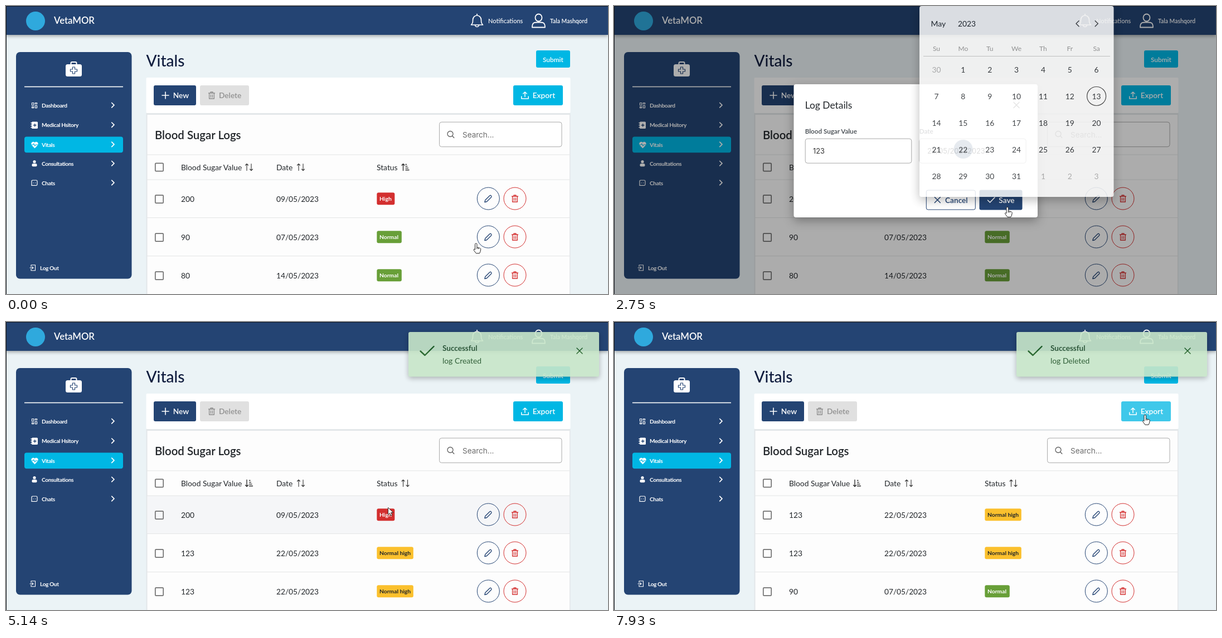
An HTML page for the animation above (8 s loop, 1080x519 px).

```html
<!DOCTYPE html>
<html lang="en">
<head>
<meta charset="utf-8">
<title>Vitals</title>
<style>
html, body { margin: 0; width: 100%; height: 100%; overflow: hidden; background: #ebf3f6; }
svg { display: block; width: 100vw; height: 100vh; font-family: Lato, "Open Sans", sans-serif; }
text { white-space: pre; }
.field { font-family: Inter, "Open Sans", sans-serif; }
.nav { font-weight: 700; font-size: 10.2px; letter-spacing: -.4px; fill: #fff; }
.line { fill: none; stroke-linecap: round; stroke-linejoin: round; }
.raised { filter: drop-shadow(0 6px 9px rgba(0,0,0,.32)); }
.toast { filter: drop-shadow(0 3px 5px rgba(0,0,0,.3)); }
.bar { filter: drop-shadow(0 2px 3px rgba(0,0,0,.35)); }
</style>
</head>
<body>
<svg id="stage" viewBox="0 0 1080 519" preserveAspectRatio="none"></svg>
<script>
const NAVY = '#244473', CYAN = '#00b7e4', RED = '#d32f2f', INK = '#212529';
const LOOP = 8000;

// Markup helpers
const text = (x, y, s, size, fill = INK, weight = 400, more = '') =>
  `<text x="${x}" y="${y}" font-size="${size}" fill="${fill}" font-weight="${weight}" ${more}>${s}</text>`;
const box = (x, y, w, h, fill, r = 0, more = '') =>
  `<rect x="${x}" y="${y}" width="${w}" height="${h}" fill="${fill}" rx="${r}" ${more}/>`;
const line = (d, color, width = 1.3, x = 0, y = 0) =>
  `<path class="line" d="${d}" stroke="${color}" stroke-width="${width}" transform="translate(${x} ${y})"/>`;
const solid = (d, fill, x = 0, y = 0) => `<path d="${d}" fill="${fill}" transform="translate(${x} ${y})"/>`;
const group = (id, body, more = '') => `<g id="${id}" ${more}>${body}</g>`;
const rule = y => box(253, y, 758, 1, '#e4e5e6');

const ICON = {
  trash: 'M-5.5-4h11M-2-4v-2h4v2M-4.4-4v10h8.8v-10M-1.5-1v4.5M1.5-1v4.5',
  pencil: 'M-6.5 6.5l1-3.8 8-8a2 2 0 0 1 2.8 2.8l-8 8z',
  close: 'M-5-5L5 5M5-5L-5 5',
  upload: 'M0 2.5V-6M-3.2-3L0-6l3.2 3M-6.2 2v4h12.4V2',
  right: 'M-2.3-4.2L2-0-2.3 4.2',
  both: 'M-4 6V-6M-6.5-3.5L-4-6l2.5 2.5M4-6V6M1.5 3.5L4 6l2.5-2.5',
  bars: 'M.5-5h1.5M.5-1.7h3M.5 1.7h4.5M.5 5h6',
  up: 'M-4 6V-6M-6.5-3.5L-4-6l2.5 2.5',
  down: 'M-4-6V6M-6.5 3.5L-4 6l2.5-2.5'
};
const sortIcon = (x, kind) => kind === 'both' ? line(ICON.both, '#333', 1.1, x, 290.5)
  : line(ICON[kind] + ICON.bars, '#222', 1.3, x, 290.5);

// Page
function header() {
  const bell = 'M-10.5 8h21c-3-3-3-5-3-9a7.5 8 0 0 0-15 0c0 4 0 6-3 9zM-3.5 8a3.5 3.5 0 0 0 7 0M0-9v-2.5';
  return box(0, 0, 1080, 52, NAVY, 0, 'class="bar"') +
    `<circle cx="53" cy="27" r="17" fill="#2fa9dd"/>` +
    text(86, 31.5, 'VetaMOR', 16.7, '#fff', 600) +
    line(bell, '#fff', 1.7, 845, 26) + text(865, 31, 'Notifications', 11, '#fff', 500) +
    line('M-6 0a6 6.5 0 1 1 12 0a6 6.5 0 1 1-12 0M-11.5 17.5c0-10 5-9 11.5-9s11.5-1 11.5 9z', '#fff', 1.8, 955.5, 21) +
    text(976, 30.5, 'Tala Mashqord', 10.4, '#fff', 600);
}

function sidebar() {
  const items = [['Dashboard', 179], ['Medical Hsitory', 214.5], ['Vitals', 249.7], ['Consultations', 284], ['Chats', 318.7]];
  let s = box(18, 83, 207.5, 408.5, NAVY, 7);
  s += box(107, 105, 29, 22, '#fff', 3.5) + line('M-5-9v-3a2 2 0 0 1 2-2h6a2 2 0 0 1 2 2v3', '#fff', 2, 121.5, 115) +
    line('M-2-6h4v4h4v4h-4v4h-4v-4h-4v-4h4z', NAVY, 1.2, 121.5, 116);
  s += box(33, 144.7, 177, 1.6, '#fff') + box(33, 235.5, 177, 28.7, CYAN, 4);
  for (const [name, y] of items)
    s += `<text class="nav" x="64" y="${y + 3.8}">${name}</text>` + line(ICON.right, '#fff', 1.7, 192, y - .3);
  s += line('M-4.5-4.5h3.2v4.5h-3.2zM1.2-4.5h3.4v2.3H1.2zM1.2.6h3.4v4H1.2zM-4.5 2.6h3.2v2h-3.2z', '#fff', 1.1, 51, 179);
  s += box(46, 208.5, 11, 12.5, '#fff', 1.6) + line('M-2.3 0h4.6M0-2.3v4.6', NAVY, 1.4, 51.7, 214.7) +
    line('M0-4h1.4M0 0h1.4M0 4h1.4', '#fff', 1.2, 44.7, 214.7);
  s += solid('M0 6.5L-5.7.5C-8-3.5-3-7.5 0-4 3-7.5 8-3.5 5.7.5z', '#fff', 51.5, 250) +
    line('M-7 0h4l1.3-2L.3 2.2 1.8 0H7', CYAN, 1.1, 51.5, 250);
  s += `<circle cx="51" cy="280.7" r="2.6" fill="#fff"/>` + box(46.5, 284, 9, 5.3, '#fff', 2);
  s += line('M-3.2-4.7h6.4a1.8 1.8 0 0 1 1.8 1.8v5.8a1.8 1.8 0 0 1-1.8 1.8h-8.2v-7.6a1.8 1.8 0 0 1 1.8-1.8M-1.7 0v.1M1.7 0v.1', '#fff', 1.2, 51, 318.7);
  s += line('M-3-2v-3h7.5v10H-3V2M-5 0h6M-.8-1.8L1 0-.8 1.8', '#fff', 1.1, 48, 471.7);
  return s + '<text class="nav" x="61" y="475.6">Log Out</text>';
}

function page() {
  let s = text(251.5, 109, 'Vitals', 28, '#0e1b3d', 500);
  s += box(951, 80, 61, 31, CYAN, 3) + text(963, 100.5, 'Submit', 11.9, '#fff', 600);
  s += box(251.5, 129, 761, 64, '#fff', 2) + box(251.5, 193, 761, 326, '#e3e7e9') + box(253.5, 196, 757.5, 323, '#fdfdfd');
  s += box(265, 143, 76, 36, NAVY, 3, 'id="newBtn"') + line('M-6 0H6M0-6V6', '#fff', 1.6, 286, 161) +
    text(299.7, 166.3, 'New', 13.7, '#fff', 600);
  s += box(348, 143, 88, 36, '#e0e0e0', 3) + line(ICON.trash, '#8d8d8d', 1.3, 369, 161) +
    text(382, 166.3, 'Delete', 13.7, '#919191', 600);
  s += box(910, 143, 89, 36, CYAN, 3, 'id="exportBtn"') + line(ICON.upload, '#fff', 1.5, 931, 161) +
    text(944.7, 166.3, 'Export', 13.7, '#fff', 600);
  s += text(267, 239.5, 'Blood Sugar Logs', 20.4, INK, 600);
  s += box(777.5, 209.2, 219.5, 44.5, '#fff', 4, 'stroke="#a9a9a9"') +
    line('M-5.5-1a5 5 0 1 1 10 0a5 5 0 1 1-10 0M3.2 2.7L6.3 6', '#5f5f5f', 1.3, 797.5, 231.5) +
    text(819, 236.5, 'Search...', 13.5, '#6c6c6c', 400, 'class="field"');
  s += group('hover', box(0, 0, 1, 1, 'rgba(36,68,115,.12)'));
  s += [267.5, 312.5, 381, 450].map(rule).join('');
  s += text(314, 296, 'Blood Sugar Value', 13.8) + text(485, 296, 'Date', 13.8) + text(665, 296, 'Status', 13.8);
  s += sortIcon(529, 'both');
  for (const y of [290.5, 348, 417, 486])
    s += box(267.8, y - 7.2, 14.4, 14.4, 'none', 1.5, 'stroke="#707070" stroke-width="1.7"');
  for (let i = 0; i < 3; i++) {
    const y = 347 + i * 69;
    s += `<circle cx="865.3" cy="${y}" r="20" fill="none" stroke="${NAVY}"/>` + line(ICON.pencil, NAVY, 1.3, 865.3, y) +
      `<circle ${i ? '' : 'id="trashBtn"'} cx="913" cy="${y}" r="20" fill="rgba(211,47,47,0)" stroke="${RED}"/>` +
      line(ICON.trash, RED, 1.3, 913, y);
  }
  return s;
}

// Table contents for each sort state
const BADGE = { High: [32, RED, '#fff'], Normal: [44.5, '#689f38', '#fff'], 'Normal high': [65.5, '#fbc02d', INK] };
const LOGS = {
  a: [200, '09/05/2023', 'High'], b: [90, '07/05/2023', 'Normal'], c: [80, '14/05/2023', 'Normal'],
  d: [87, '19/05/2023', 'Normal'], e: [123, '22/05/2023', 'Normal high']
};
const VIEWS = [
  { from: 0, rows: 'abc', value: 'both', status: 'up' },
  { from: 4060, rows: 'cdb', value: 'up', status: 'both' },
  { from: 4340, rows: 'aee', value: 'down', status: 'both' },
  { from: 6740, rows: 'eeb', value: 'down', status: 'both' }
];
const view = (v, i) => group('view' + i, sortIcon(436, v.value) + sortIcon(716.5, v.status) + [...v.rows].map((key, n) => {
  const [value, date, state] = LOGS[key], [w, fill, ink] = BADGE[state], y = 347.3 + n * 69;
  return text(314, y + 5.5, value, 13.8) + text(485, y + 5.5, date, 13.7) +
    box(665.3, y - 11, w, 22, fill, 3) + text(670, y + 3.8, state, 10.3, ink, 700);
}).join(''));

// Overlays
const toast = (id, what) => group(id, box(722, 18, 342, 80.5, '#c8e6c9', 3) +
  line('M-12 .5L-4 8 12-8', '#1b5e20', 2.4, 755.5, 52) + text(783, 52, 'Successful', 13.6, '#1d4a24', 600) +
  text(783, 75.3, `log ${what}`, 13.9, '#1f5226') + line(ICON.close, '#1b5e20', 1.5, 1029, 52), 'class="toast"');

function logDialog() {
  return group('logDialog', box(322.5, 141, 437.5, 240, '#fff', 4) +
    text(342.7, 185, 'Log Details', 17.4) + line(ICON.close, '#555', 1.4, 722, 178.5) +
    text(342.7, 229.7, 'Blood Sugar Value', 11.7, '#3d4349', 600) + text(547.7, 229.7, 'Date', 11.7, '#3d4349', 600) +
    box(343.2, 239.2, 190.6, 44, '#fff', 4, 'id="valueBox"') + box(548, 239.2, 191.2, 44, '#fff', 4, 'id="dateBox"') +
    text(357, 266, '', 12.8, '#333', 400, 'class="field" id="value"') +
    text(562, 266, '', 12.8, '#333', 400, 'class="field" id="date"') + box(0, 253.5, 1, 16, '#222', 0, 'id="caret"') +
    box(560.3, 332, 88, 35, '#fff', 3, `stroke="${NAVY}"`) + line(ICON.close, NAVY, 1.5, 580.3, 349.5) +
    text(594, 355, 'Cancel', 13.7, NAVY, 600) + box(655.5, 331.5, 77, 36, NAVY, 3) +
    line('M-6 .5L-2 4.5 6.5-4.5', '#fff', 1.6, 676.5, 349.5) + text(690.3, 355, 'Save', 13.7, '#fff', 600), 'class="raised"');
}

function calendar() {
  let s = box(548, 0, 348.5, 344, '#fff', 4) + text(568.5, 36.8, 'May', 13.9) + text(617, 36.8, '2023', 13.8) +
    line('M2.5-5L-2.5 0l5 5', '#444', 1.5, 831.5, 31.7) + line('M-2.5-5L2.5 0l-5 5', '#444', 1.5, 865.7, 31.7) +
    box(555, 90, 335, 1, '#c4c4c4');
  const mid = 'text-anchor="middle"', col = i => 578.5 + i * 47.85;
  ['Su', 'Mo', 'Tu', 'We', 'Th', 'Fr', 'Sa'].forEach((d, i) => s += text(col(i), 81, d, 12, '#8d8d8d', 400, mid));
  s += `<circle cx="626.5" cy="258" r="17" fill="rgba(36,68,115,.13)"/>` +
    `<circle cx="865.6" cy="162.5" r="17" fill="none" stroke="#333" stroke-width="1.2"/>`;
  for (let i = 0; i < 35; i++) {
    const out = i < 1 || i > 31, day = i < 1 ? 30 : i > 31 ? i - 31 : i;
    s += text(col(i % 7), 120 + 47.9 * Math.floor(i / 7), day, 13.8, out ? '#a9a9a9' : INK, 400, mid);
  }
  return group('calendar', s, 'class="raised"');
}

function confirmDialog() {
  return group('confirm', box(324, 168, 434, 185.5, '#fff', 4) + text(344.7, 211.5, 'Confirm', 17.1) +
    line(ICON.close, '#555', 1.4, 720.5, 205) +
    line('M0-11.5L12.5 11.5h-25zM0-4v8M0 7.6v.2', '#222', 1.9, 358.3, 256.5) +
    text(385.5, 267.7, 'Are you sure you want to delete the blood sugar log?', 13.6, '#333') +
    box(616, 304.7, 53.5, 35, '#fff', 3, `stroke="${NAVY}"`) + text(633.3, 327.8, 'No', 13.7, NAVY, 600) +
    box(677, 304.5, 54, 35.5, RED, 3) + text(693, 327.8, 'Yes', 13.4, '#fff', 600), 'class="raised"');
}

const POINTERS = {
  hand: '<path d="M-2 1.5a1.7 1.7 0 0 1 3.4 0V7l5 1.2c1.3.4 2 1 1.8 2.5l-.8 4-1.4 3H-.2l-4-5.5c-1-1.5.6-2.6 1.8-1.6l.4.6z" fill="#fff" stroke="#222" stroke-linejoin="round"/><path d="M1.4 7v3M4 8v2" stroke="#222" fill="none"/>',
  arrow: '<path d="M0 0v13l3-2.8 2 4.6 2.2-1-2-4.5h4z" fill="#fff" stroke="#222" stroke-width=".9"/>',
  beam: line('M-3.5-7H-1l1 1 1-1h2.5M0-6V6M-3.5 7H-1l1-1 1 1h2.5', '#111', 1.5)
};

document.getElementById('stage').innerHTML =
  box(0, 0, 1080, 519, '#ebf3f6') + header() + sidebar() + page() + VIEWS.map(view).join('') +
  toast('created', 'Created') + toast('deleted', 'Deleted') +
  box(0, 0, 1080, 519, '#000', 0, 'id="mask"') + box(0, 0, 1, 519, '#0b0f16') + box(0, 0, 1080, 1, '#0b1526') +
  logDialog() + calendar() + confirmDialog() +
  group('pointer', Object.keys(POINTERS).map(k => group(k, POINTERS[k])).join(''));

const el = {};
document.querySelectorAll('[id]').forEach(e => el[e.id] = e);
const set = (e, attrs) => { for (const k in attrs) e.setAttribute(k, attrs[k]); };
const show = (e, on) => e.setAttribute('display', on ? 'inline' : 'none');

// Pointer path: time, x, y
const PATH = [
  [0, 843.5, 428], [40, 843.5, 428], [670, 318, 143], [800, 303, 160], [960, 303, 160], [1330, 465.5, 262],
  [1720, 465.5, 262], [2020, 630, 258], [2500, 630, 257], [2745, 706, 362.5], [3330, 706, 362.5],
  [4040, 377, 295], [4700, 377, 295], [5500, 912, 363], [6080, 912, 363], [6640, 691, 329],
  [6960, 691, 329], [7770, 954, 169], [7850, 954, 169], [7930, 953, 167.5], [8000, 953, 167.5]
];
const KINDS = [
  [0, 'hand'], [110, 'arrow'], [690, 'hand'], [1010, 'arrow'], [1240, 'beam'], [1830, 'arrow'], [1900, 'beam'],
  [2130, 'hand'], [2560, 'arrow'], [2690, 'hand'], [3340, 'arrow'], [3930, 'hand'], [4860, 'arrow'], [5440, 'hand'],
  [5690, 'arrow'], [6570, 'hand'], [6890, 'arrow'], [7600, 'hand']
];
const TYPED = [[0, ''], [1400, '1'], [1580, '12'], [1690, '123']];
const at = (table, t) => table.filter(r => r[0] <= t).pop()[1];
const easeOut = p => 1 - (1 - p) ** 3;
const smooth = p => p * p * (3 - 2 * p);

function pointerAt(t) {
  let i = 0;
  while (i < PATH.length - 2 && PATH[i + 1][0] <= t) i++;
  const [t0, x0, y0] = PATH[i], [t1, x1, y1] = PATH[i + 1], p = smooth((t - t0) / (t1 - t0));
  return [x0 + (x1 - x0) * p, y0 + (y1 - y0) * p];
}

function popup(e, amount, base) {
  show(e, amount > 0);
  set(e, { opacity: amount, transform: `translate(541 260.8) scale(${(.7 + .3 * amount) / base}) translate(-541 -260.8)` });
}

function slide(e, enter, leave) {
  show(e, enter > 0 && leave < 1);
  set(e, { opacity: .9 * enter * (1 - leave), transform: `translate(0 ${40 * (1 - enter)})` });
}

function hoverBox(x, y, t, dim) {
  if (dim) return null;
  if (y > 268 && y < 312.5) {
    const edges = [300, 471.5, 651, 830], i = edges.findIndex((e, n) => x >= e && x < edges[n + 1]);
    return i < 0 ? null : [edges[i], 268, edges[i + 1] - edges[i], 44.5, 1];
  }
  return t > 3300 && y >= 312.5 && y < 381 ? [254, 313, 757, 68, .3] : null;
}

function draw(t) {
  const ramp = (a, b) => Math.min(1, Math.max(0, (t - a) / (b - a)));
  const during = (a, b) => t >= a && t < b;

  VIEWS.forEach((v, i) => show(el['view' + i], during(v.from, i < 3 ? VIEWS[i + 1].from : LOOP)));
  const dim = ramp(930, 1080) - ramp(3220, 3400) + ramp(5660, 5800) - ramp(6760, 6910);
  set(el.mask, { opacity: .32 * dim });
  popup(el.logDialog, easeOut(ramp(940, 1090)) - ramp(3200, 3350), 1);
  popup(el.confirm, easeOut(ramp(5690, 5840)) - ramp(6731, 6881), .99);
  slide(el.created, easeOut(ramp(3230, 3530)), ramp(6200, 6400));
  slide(el.deleted, easeOut(ramp(6775, 7075)), 0);

  const cal = ramp(2080, 2200), gone = ramp(2735, 2835);
  show(el.calendar, cal > 0 && gone < 1);
  set(el.calendar, { opacity: cal * (1 - gone), transform: `translate(0 344) scale(1 ${.8 + .2 * cal}) translate(0 -344)` });

  const focus = (e, on) => set(e, { stroke: on ? NAVY : '#a9a9a9', 'stroke-width': on ? 2 : 1 });
  focus(el.valueBox, during(1250, 2050));
  focus(el.dateBox, during(2050, 2700));
  el.value.textContent = at(TYPED, t);
  el.date.textContent = t >= 2520 ? '22/05/20232023' : '';
  show(el.caret, during(1280, 2050));
  set(el.caret, { x: 357 + (el.value.textContent ? el.value.getComputedTextLength() : 0) });

  set(el.newBtn, { fill: during(700, 960) ? '#3c5985' : NAVY });
  set(el.exportBtn, { fill: t >= 7640 ? '#3fc8ea' : CYAN });
  set(el.trashBtn, { fill: `rgba(211,47,47,${during(5440, 5600) ? .05 : during(5600, 6740) ? .18 : 0})` });

  const [x, y] = pointerAt(t), h = hoverBox(x, y, t, dim > .01);
  show(el.hover, h);
  if (h) {
    set(el.hover.firstChild, { x: h[0], y: h[1], width: h[2], height: h[3] });
    set(el.hover, { opacity: h[4] });
  }
  set(el.pointer, { transform: `translate(${x} ${y})` });
  const kind = at(KINDS, t);
  for (const k in POINTERS) show(el[k], k === kind);
}

const start = performance.now();
function tick() {
  draw((performance.now() - start) % LOOP);
  requestAnimationFrame(tick);
}
tick();
</script>
</body>
</html>
```
